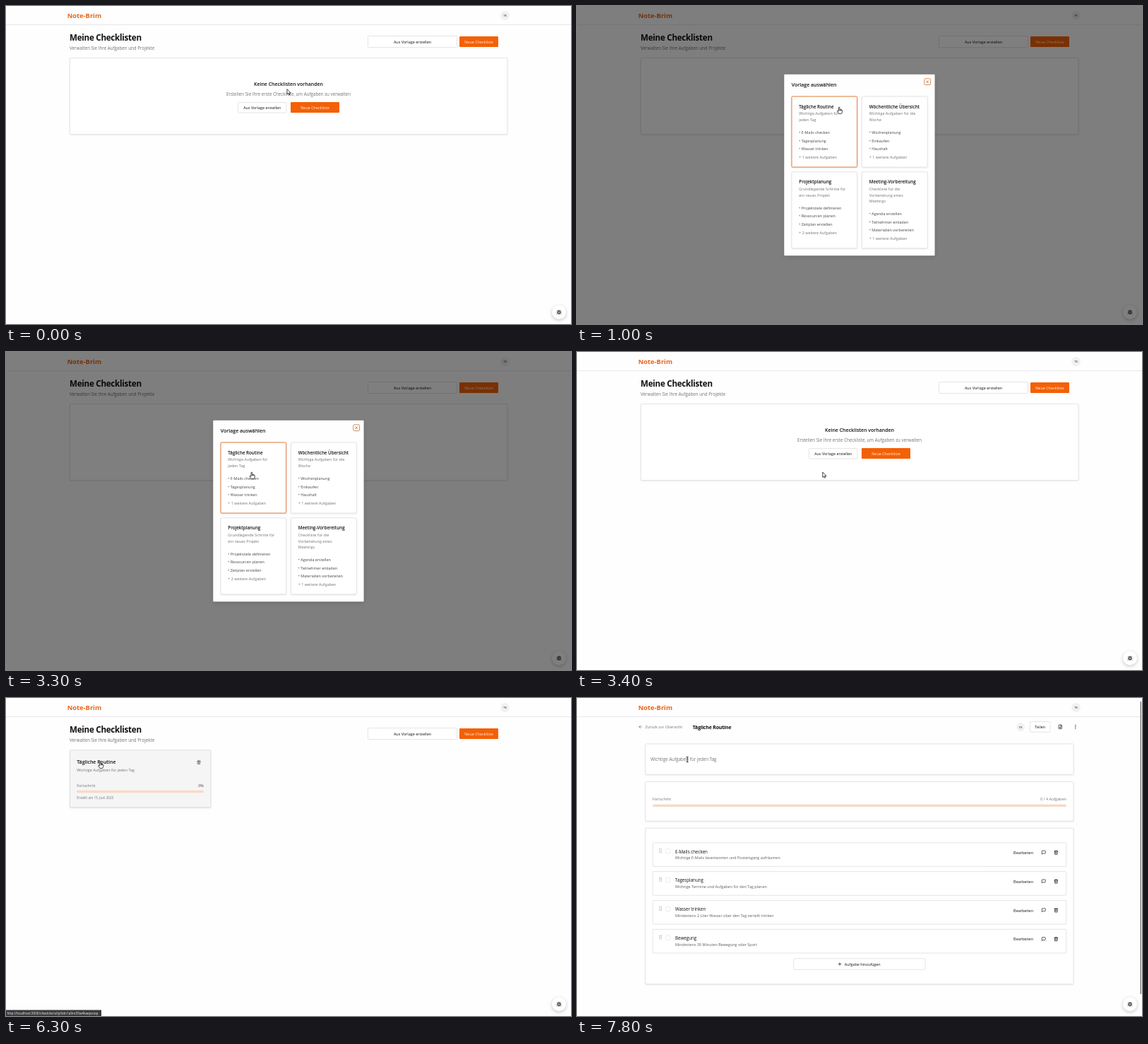
An HTML page with a canvas for the animation above (8000 ms loop, 800x450 px).

```html
<!DOCTYPE html>
<html lang="de">
<head>
<meta charset="utf-8">
<title>Checklisten</title>
<style>
html, body { margin: 0; width: 100%; height: 100%; overflow: hidden; background: #fefefe; }
canvas { display: block; width: 800px; height: 450px; }
</style>
</head>
<body>
<canvas id="stage" width="800" height="450"></canvas>
<script>
const ctx = document.getElementById('stage').getContext('2d');
const LOOP = 8000, STEP = 100;
const UNIT = 5 / 12;          // CSS pixel of the recorded 1920 px screen
const FONT_SCALE = 0.933;     // keeps the x-height of the system font
const INK = '#111114', GREY = '#72727a', SOFT = '#46464c';
const LINE = '#e5e5e7', ORANGE = '#f46006', PEACH = '#f9d9c6';

const ICONS = {
  trash: 'M3 6h18M19 6v14a2 2 0 0 1-2 2H7a2 2 0 0 1-2-2V6M8 6V4a2 2 0 0 1 2-2h4a2 2 0 0 1 2 2v2M10 11v6M14 11v6',
  comment: 'M21 15a2 2 0 0 1-2 2H7l-4 4V5a2 2 0 0 1 2-2h14a2 2 0 0 1 2 2z',
  file: 'M15 2H6a2 2 0 0 0-2 2v16a2 2 0 0 0 2 2h12a2 2 0 0 0 2-2V7zM14 2v5h6M12 18v-6M9 15h6',
  back: 'M12 19l-7-7 7-7M19 12H5',
  plus: 'M5 12h14M12 5v14',
  close: 'M18 6L6 18M6 6l12 12',
  bug: 'M8 2l1.9 1.9M14.1 3.9L16 2M9 7.1V6a3 3 0 0 1 6 0v1.1M12 20a6 6 0 0 1-6-6v-3a4 4 0 0 1 4-4h4a4 4 0 0 1 4 4v3a6 6 0 0 1-6 6zM12 20v-9M6 13H2M22 13h-4M6.5 9L3 5M17.5 9L21 5M6 17l-4 4M18 17l4 4'
};
const ARROW = new Path2D('M0 0V7.3L1.7 5.8L2.8 8.2L4 7.7L2.9 5.4H5.2Z');
const HAND = new Path2D('M-.8 .6Q0-.5 .8 .6V3.4L3.6 4Q4.6 4.3 4.5 5.4L4 8.2L3.3 9.4H-.5L-2.6 6.2Q-2.9 5.1-1.8 5.2L-.8 6Z');

// y is the middle of the capital letters, px the size in CSS pixels
function text(str, x, y, px, color = INK, weight = 400, align = 'left', tracking = 0) {
  const size = px * UNIT * FONT_SCALE;
  ctx.font = `${weight} ${size}px "Open Sans", "Noto Sans", sans-serif`;
  ctx.letterSpacing = tracking * size + 'px';
  ctx.textAlign = align;
  ctx.fillStyle = color;
  ctx.fillText(str, x, y + size * 0.36);
}

function box(x, y, w, h, fill, stroke, r = 1, shadow = 0) {
  ctx.save();
  ctx.beginPath();
  ctx.roundRect(x, y, w, h, r);
  if (shadow) {
    ctx.shadowColor = 'rgba(0,0,0,.13)';
    ctx.shadowBlur = shadow;
    ctx.shadowOffsetY = shadow / 3;
  }
  ctx.fillStyle = fill;
  ctx.fill();
  ctx.restore();
  if (stroke) {
    ctx.strokeStyle = stroke;
    ctx.lineWidth = 1;
    ctx.stroke();
  }
}

function disc(x, y, r, fill) {
  ctx.beginPath();
  ctx.arc(x, y, r, 0, 7);
  ctx.fillStyle = fill;
  ctx.fill();
}

function icon(name, x, y, color = INK, size = 6.67) {
  ctx.save();
  ctx.translate(x - size / 2, y - size / 2);
  ctx.scale(size / 24, size / 24);
  ctx.lineWidth = 2.4;
  ctx.lineCap = ctx.lineJoin = 'round';
  ctx.strokeStyle = color;
  ctx.stroke(new Path2D(ICONS[name]));
  ctx.restore();
}

function button(label, x, y, w, h, primary, hover) {
  box(x, y, w, h, primary ? ORANGE : hover ? '#f4f4f5' : '#fff', primary ? null : LINE);
  text(label, x + w / 2, y + h / 2 + 0.2, 14, primary ? '#fff3ea' : INK, 400, 'center');
}

function avatar(x, y, r) {
  disc(x, y, r, '#f1f1f2');
  text('TK', x, y + 0.2, 10, INK, 400, 'center');
}

function frame() {
  ctx.fillStyle = '#fefefe';
  ctx.fillRect(0, 0, 800, 450);
  ctx.fillStyle = '#e9e9eb';
  ctx.fillRect(0, 26, 800, 1);
  text('Note-Brim', 86.7, 14, 24, '#e8641a', 700);
  avatar(706.5, 13.5, 6.5);
}

function bugButton() {
  ctx.save();
  ctx.shadowColor = 'rgba(0,0,0,.22)';
  ctx.shadowBlur = 5;
  ctx.shadowOffsetY = 1.5;
  disc(783, 433.3, 10, '#fff');
  ctx.restore();
  icon('bug', 783, 433.4, INK, 7);
}

function overview() {
  frame();
  text('Meine Checklisten', 90, 45.2, 30, INK, 700, 'left', -0.025);
  text('Verwalten Sie Ihre Aufgaben und Projekte', 90, 59.3, 16, GREY);
  button('Aus Vorlage erstellen', 512.5, 42.5, 126, 16);
  button('Neue Checkliste', 642, 43, 55, 15, true);
}

function emptyState(hover) {
  box(90.5, 73.5, 619.5, 108, '#fff', LINE, 1, 2.5);
  text('Keine Checklisten vorhanden', 400, 110.5, 18, INK, 600, 'center');
  text('Erstellen Sie Ihre erste Checkliste, um Aufgaben zu verwalten', 400, 125, 16, GREY, 400, 'center');
  button('Aus Vorlage erstellen', 328.5, 136.5, 68.5, 14.5, false, hover);
  button('Neue Checkliste', 403, 136, 69, 15, true);
}

const TEMPLATES = [
  ['Tägliche Routine', ['Wichtige Aufgaben für', 'jeden Tag'],
    ['E-Mails checken', 'Tagesplanung', 'Wasser trinken'], 1],
  ['Wöchentliche Übersicht', ['Wichtige Aufgaben für die', 'Woche'],
    ['Wochenplanung', 'Einkaufen', 'Haushalt'], 1],
  ['Projektplanung', ['Grundlegende Schritte für', 'ein neues Projekt'],
    ['Projektziele definieren', 'Ressourcen planen', 'Zeitplan erstellen'], 2],
  ['Meeting-Vorbereitung', ['Checkliste für die', 'Vorbereitung eines', 'Meetings'],
    ['Agenda erstellen', 'Teilnehmer einladen', 'Materialien vorbereiten'], 1]
];

function templateCard([title, desc, tasks, more], i) {
  const x = i % 2 ? 403.5 : 304, y = i < 2 ? 128 : 234.8;
  box(x, y, 92.7, i < 2 ? 100 : 108, '#fff', i ? LINE : '#e27a3c', 1.2, 2.5);
  const tx = x + 10.3;
  text(title, tx, y + 14.4, 16, INK, 600);
  desc.forEach((line, n) => text(line, tx, y + 24.5 + n * 8.33, 14, GREY));
  let ty = y + 34.4 + desc.length * 8.33;
  for (const task of tasks) {
    text('• ' + task, tx, ty, 14, SOFT);
    ty += 11.67;
  }
  text(`+ ${more} weitere Aufgaben`, tx, ty, 14, GREY);
}

function modal() {
  ctx.fillStyle = 'rgba(0,0,0,.5)';
  ctx.fillRect(0, 0, 800, 450);
  box(293.3, 96.7, 213.3, 256.6, '#fefefe', null, 1, 6);
  text('Vorlage auswählen', 303.8, 111.5, 18, INK, 600);
  box(491.8, 102.8, 8.8, 8.8, '#fff', '#dc8a50', 1.6);
  icon('close', 496.2, 107.2, SOFT, 6);
  TEMPLATES.forEach(templateCard);
}

function listCard(hover) {
  box(90.5, 73.8, 199.5, 81, hover ? '#f5f5f6' : '#fff', '#dfdfe1', 1.2, 2.5);
  text('Tägliche Routine', 100.2, 90.5, 18, INK, 600);
  text('Wichtige Aufgaben für jeden Tag', 100.2, 102.3, 14, GREY);
  icon('trash', 273, 91, SOFT, 6.2);
  text('Fortschritt', 100.2, 124, 14, GREY);
  text('0%', 279.8, 124, 14, SOFT, 400, 'right');
  box(100, 130.8, 180, 3.4, PEACH, null, 1.7);
  text('Erstellt am 15. Juni 2025', 100.2, 141.3, 12, GREY);
}

function statusBar() {
  box(0, 441.5, 135, 8.5, '#3a3a3c', null, 0);
  text('http://localhost:3000/checklist/u0yihdn1a9ro35w4kwqssiop', 1.4, 446, 12, '#f2f2f2');
}

const TASKS = [
  ['E-Mails checken', 'Wichtige E-Mails beantworten und Posteingang aufräumen'],
  ['Tagesplanung', 'Wichtige Termine und Aufgaben für den Tag planen'],
  ['Wasser trinken', 'Mindestens 2 Liter Wasser über den Tag verteilt trinken'],
  ['Bewegung', 'Mindestens 30 Minuten Bewegung oder Sport']
];

function taskRow([title, desc], i) {
  const y = 204.8 + i * 40.85;
  box(107.2, y, 585.5, 33.6, '#fff', LINE, 0.8);
  for (let n = 0; n < 6; n++) disc(117 + n % 2 * 2.3, y + 9 + (n >> 1) * 2.2, 0.55, '#77777d');
  box(125.8, y + 8.8, 6.4, 6.4, '#fff', '#ececee', 0.8);
  text(title, 139, y + 12.6, 16);
  text(desc, 139, y + 21.6, 14, '#5c5c63');
  text('Bearbeiten', 646, y + 14.1, 14, INK, 400, 'right');
  icon('comment', 660.8, y + 13.8);
  icon('trash', 678.3, y + 13.8);
}

function detail() {
  frame();
  icon('back', 89.8, 40.8, GREY);
  text('Zurück zur Übersicht', 96.5, 41, 14, GREY);
  text('Tägliche Routine', 163.8, 41, 18, INK, 700, 'left', -0.025);
  avatar(628, 41, 6);
  button('Teilen', 641.5, 33.5, 28.5, 14.6);
  icon('file', 684.2, 40.8);
  for (const dy of [-2.2, 0, 2.2]) disc(705.8, 40.9 + dy, 0.65, INK);

  for (const [y, h] of [[65, 43.2], [118.6, 55.6], [184.2, 220.6]]) {
    box(97, y, 606, h, '#fff', LINE, 1, 2.5);
  }
  text('Wichtige Aufgaben für jeden Tag', 104, 87, 16, GREY);
  text('Fortschritt', 107, 143.5, 14, GREY);
  text('0 / 4 Aufgaben', 692.8, 143.5, 14, GREY, 400, 'right');
  box(107, 150.6, 586, 3.3, PEACH, null, 1.6);
  TASKS.forEach(taskRow);
  box(306.8, 368.7, 186.4, 15.6, '#fff', LINE);
  icon('plus', 372, 376.5);
  text('Aufgabe hinzufügen', 378.8, 376.7, 14);
  box(797.6, 5, 1.4, 414, '#77777a', null, 0.6);
}

// Pointer tip: time, x, y
const TRACK = [
  [0, 398, 117.6], [900, 371.2, 143], [1500, 371.2, 143], [2300, 348.2, 170.4],
  [3400, 347.8, 170], [3600, 340.5, 169], [4500, 340.5, 169],
  [4600, 133.4, 90], [7500, 133.4, 90], [7600, 156.2, 87], [LOOP, 156.2, 87]
];

function pointerAt(t) {
  const i = TRACK.findIndex(p => p[0] > t);
  const [t0, x0, y0] = TRACK[i - 1], [t1, x1, y1] = TRACK[i];
  const p = (t - t0) / (t1 - t0), k = p * p * (3 - 2 * p);
  return [x0 + (x1 - x0) * k, y0 + (y1 - y0) * k];
}

function drawPointer(kind, x, y) {
  ctx.save();
  ctx.translate(x, y);
  ctx.lineJoin = 'round';
  ctx.strokeStyle = '#18181a';
  ctx.fillStyle = '#fff';
  ctx.lineWidth = 0.8;
  if (kind === 'beam') {
    ctx.stroke(new Path2D('M-1.6-3.5H1.6M0-3.5V3.5M-1.6 3.5H1.6'));
  } else {
    const shape = kind === 'hand' ? HAND : ARROW;
    ctx.fill(shape);
    ctx.stroke(shape);
    if (kind === 'hand') ctx.stroke(new Path2D('M.8 3.4V5.2M2.1 3.8V5.2M3.3 4V5.2'));
  }
  ctx.restore();
}

function render(t) {
  const [x, y] = pointerAt(t);
  const open = t >= 1000 && t < 3400;
  const overButton = t < 1000 && x < 397 && y > 136;
  let kind = 'arrow';

  if (t >= 7600) {
    detail();
    kind = 'beam';
  } else {
    overview();
    if (t < 3800) emptyState(overButton);
    else listCard(t >= 4800);
    if (overButton || open || t >= 4600) kind = 'hand';
  }
  bugButton();
  if (t >= 4800 && t < 7600) statusBar();
  if (open) modal();
  drawPointer(kind, x, y);
}

const start = performance.now();
function tick() {
  const t = (performance.now() - start) % LOOP;
  render(Math.floor(t / STEP) * STEP);
  requestAnimationFrame(tick);
}
tick();
</script>
</body>
</html>
```
